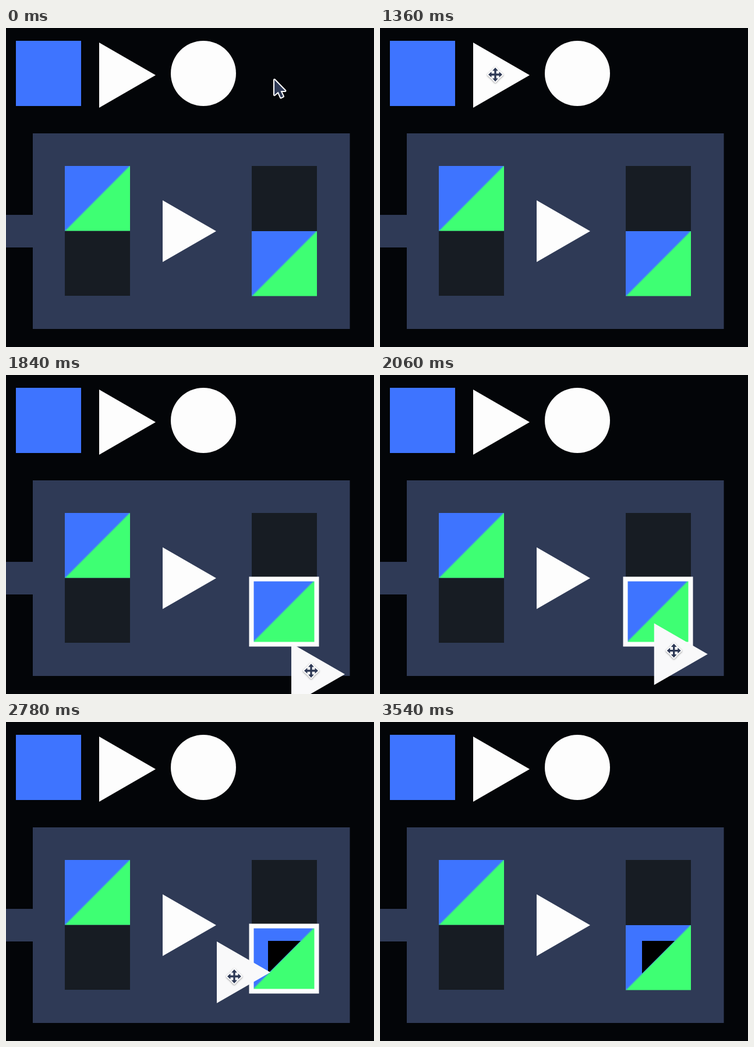
These frames come from a looping animation (632x548 px, 3560 ms). An HTML page with a canvas:

```html
<!DOCTYPE html>
<html lang="en">
<head>
<meta charset="utf-8">
<title>Shape drag</title>
<style>
  html, body { margin: 0; width: 100%; height: 100%; overflow: hidden; background: #030508; }
  canvas { display: block; }
</style>
</head>
<body>
<canvas id="stage" width="632" height="548"></canvas>
<script>
const ctx = document.getElementById('stage').getContext('2d');
const LOOP = 3560;
const C = {
  back: '#030508', panel: '#2f3a56', slot: '#171c23',
  blue: '#3e74ff', green: '#3eff73', ink: '#2f3a56', white: '#fdfdfd'
};

// Pointer legs: [time, x, y] keys; grab is the piece's offset from the pointer.
const legs = [
  { keys: [[0, 460, 86], [260, 452, 91], [540, 470, 95], [820, 491, 101],
           [940, 479, 102], [1080, 428, 98], [1240, 265, 86], [1340, 198, 80]] },
  { keys: [[1340, 198, 80]], press: true },
  { keys: [[1560, 198, 80], [1660, 360, 300], [1840, 524, 508],
           [1940, 535, 512], [2080, 501, 468], [2300, 484, 424]],
    press: true, grab: [-34, 6] },
  { keys: [[2300, 484, 424], [2400, 480, 437]], hover: true },
  { keys: [[2560, 480, 437], [2660, 435, 437], [2780, 392, 437],
           [2880, 370, 465], [2980, 375, 560], [3060, 385, 640]],
    press: true, grab: [-30, -7] }
];
const DROP = 2300, REGRAB = 2560, GONE = 3060;
const rest = { x: 450, y: 430 };

// Smooth path through timed keys, at rest at both ends.
function along(keys, t) {
  const last = keys.length - 1;
  if (t >= keys[last][0]) return { x: keys[last][1], y: keys[last][2] };
  let i = 0;
  while (t >= keys[i + 1][0]) i++;
  const a = keys[i], b = keys[i + 1], span = b[0] - a[0];
  const u = (t - a[0]) / span, u2 = u * u, u3 = u2 * u;
  const slope = (k, d) => k === 0 || k === last ? 0 :
    (keys[k + 1][d] - keys[k - 1][d]) / (keys[k + 1][0] - keys[k - 1][0]);
  const at = d => (2 * u3 - 3 * u2 + 1) * a[d] + (3 * u2 - 2 * u3) * b[d] +
    span * ((u3 - 2 * u2 + u) * slope(i, d) + (u3 - u2) * slope(i + 1, d));
  return { x: at(1), y: at(2) };
}

function rect(x, y, w, h, fill) {
  ctx.fillStyle = fill;
  ctx.fillRect(x, y, w, h);
}

function triangle(x, cy, w, h, fill = C.white) {
  ctx.fillStyle = fill;
  ctx.beginPath();
  ctx.moveTo(x, cy - h / 2);
  ctx.lineTo(x + w, cy);
  ctx.lineTo(x, cy + h / 2);
  ctx.fill();
}

function splitCell(x, y) {
  const g = ctx.createLinearGradient(x, y, x + 112, y + 111.5);
  g.addColorStop(0.49, C.blue);
  g.addColorStop(0.51, C.green);
  rect(x, y, 112, 111.5, g);
}

function scene() {
  rect(0, 0, 632, 548, C.back);
  rect(17, 22, 112, 112, C.blue);
  triangle(160, 81, 97, 112);
  ctx.beginPath();
  ctx.arc(339, 78, 56, 0, 7);
  ctx.fill();
  rect(46, 181, 544.5, 336, C.panel);
  rect(0, 321, 46, 56, C.panel);
  splitCell(101, 237);
  rect(101, 349, 112, 111, C.slot);
  rect(422, 237, 112, 112, C.slot);
  splitCell(422, 349);
  triangle(269, 349, 92, 106);
}

function cutout() {
  ctx.fillStyle = '#000';
  ctx.beginPath();
  ctx.moveTo(450, 376);
  ctx.lineTo(506, 376);
  ctx.lineTo(450, 432);
  ctx.fill();
}

function frame() {
  ctx.strokeStyle = C.white;
  ctx.lineWidth = 8;
  ctx.strokeRect(421.5, 350.5, 112, 112);
}

const arrow = new Path2D('M1 3V29L7.5 23.5 12 33.5 16 31.5 11.5 22H19.5Z');

const headed = 'l-5 5.5h3.3v4.8h-4.8v-3.3l-5.5 5 5.5 5v-3.3h4.8v4.8h-3.3l5 5.5 5-5.5h-3.3v-4.8h4.8v3.3l5.5-5-5.5-5v3.3h-4.8v-4.8h3.3z';
const cross = new Path2D('M0 -12' + headed);

const hand = new Path2D('M0 1.5C0-.7 3-.7 3.4 1.5L5 11V9.5C5.5 7.8 8 8 8.4 9.6' +
  'L8.8 11C9.4 9 12 9.2 12.3 10.8L12.6 12C13.3 10.3 15.6 10.6 15.9 12.2' +
  'L16.5 17C16.8 20 15.8 22 14.8 24V27H5.5V25C3 22-.5 19-2.2 15.8' +
  'C-3 13.8-.8 13 .4 14.5L1.8 16Z');
const creases = new Path2D('M7.2 17v6M10.2 17v6M13 17v6');

function outlined(path, width) {
  ctx.lineJoin = 'round';
  ctx.lineWidth = width;
  ctx.strokeStyle = '#fff';
  ctx.shadowColor = 'rgba(0,0,0,.4)';
  ctx.shadowBlur = 3;
  ctx.shadowOffsetY = 1;
  ctx.stroke(path);
  ctx.shadowColor = 'transparent';
  ctx.fillStyle = C.ink;
  ctx.fill(path);
}

function cursor(kind, p) {
  ctx.save();
  ctx.translate(p.x, p.y);
  if (kind === 'move') {
    outlined(cross, 4);
  } else if (kind === 'hand') {
    ctx.translate(1.5, -2.5);
    ctx.rotate(-0.2);
    outlined(hand, 4);
    ctx.lineWidth = 1;
    ctx.stroke(creases);
  } else {
    outlined(arrow, 4);
  }
  ctx.restore();
}

function overPalette({ x, y }) {
  return Math.hypot(x - 339, y - 78) < 56 ||
    (x > 160 && x < 257 && Math.abs(y - 81) < (257 - x) * 0.577);
}

const overTarget = ({ x, y }) =>
  x + 92 > 418 && x < 538 && y - 53 < 467 && y + 53 > 346;

function draw(t) {
  const leg = legs.filter(l => l.keys[0][0] <= t).pop();
  const p = along(leg.keys, t);
  let piece = null;
  if (leg.grab) piece = { x: p.x + leg.grab[0], y: p.y + leg.grab[1] };
  else if (t >= DROP && t < REGRAB) piece = rest;

  scene();
  if (t >= DROP) cutout();
  if (t < GONE) {
    if (leg.grab && overTarget(piece)) frame();
    if (piece) triangle(piece.x, piece.y, 92, 106, '#f9f9fa');
    cursor(leg.press ? 'move' : leg.hover || overPalette(p) ? 'hand' : 'arrow', p);
  }
}

let start;
function tick(now) {
  start ??= now;
  draw((now - start) % LOOP);
  requestAnimationFrame(tick);
}
draw(0);
requestAnimationFrame(tick);
</script>
</body>
</html>
```
